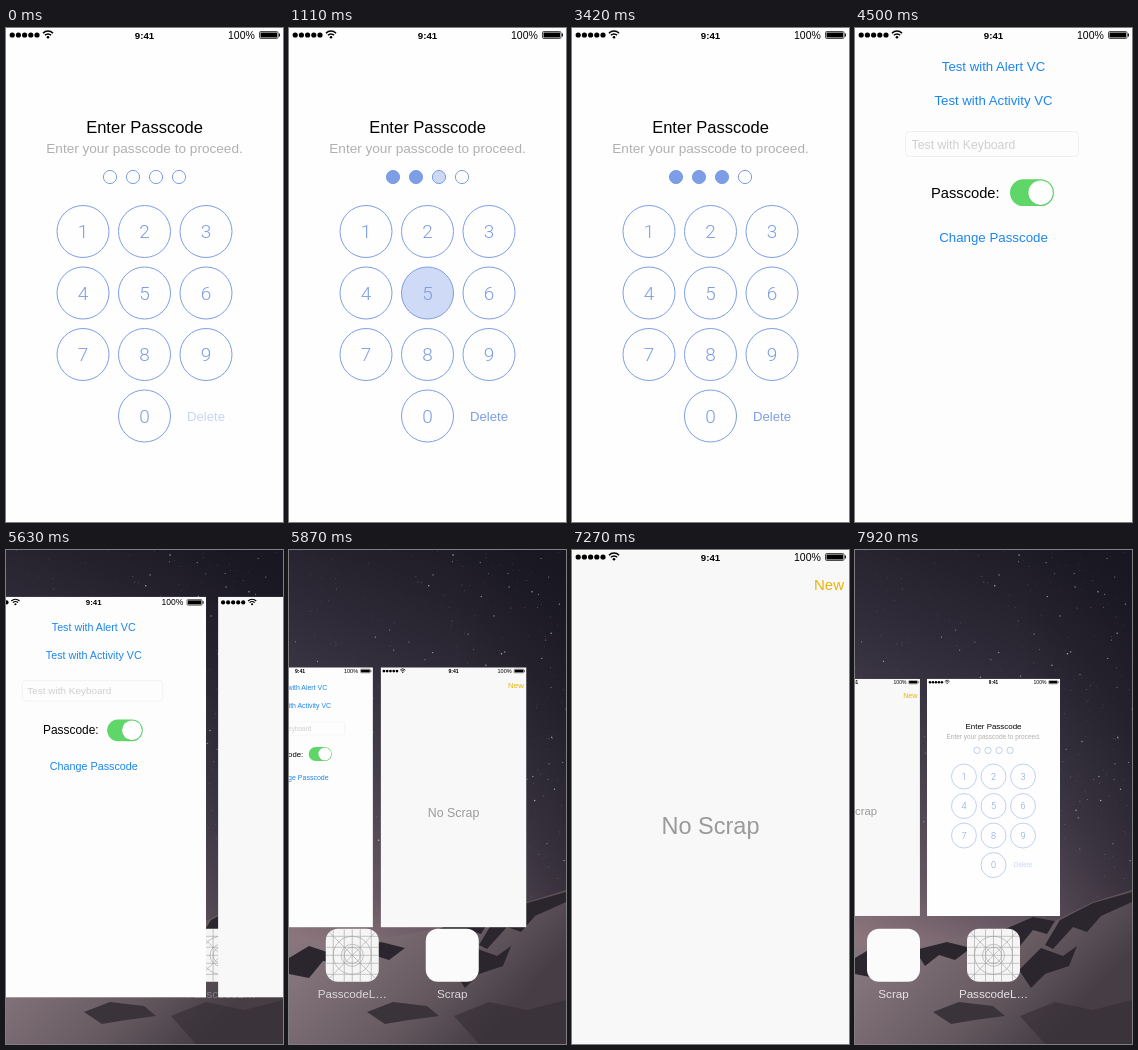
Recreate the animation shown at these times as an HTML page. Size 277 by 494 pixels, loop 8 s.

```html
<!DOCTYPE html>
<html lang="en">
<head>
<meta charset="utf-8">
<title>Passcode lock</title>
<style>
  html, body { margin: 0; width: 100%; height: 100%; overflow: hidden; background: #2c2b36; }
  svg { display: block; width: 100vw; height: 100vh; }
  text { font-family: "Liberation Sans", Arial, sans-serif; }
  .digit { font-family: Roboto, "Liberation Sans", sans-serif; font-weight: 300; }
</style>
</head>
<body>
<svg id="stage" viewBox="0 0 277 494" preserveAspectRatio="none"></svg>
<script>
const W = 277, H = 494, MID = W / 2, LOOP = 8000;
const BLUE = [125, 158, 230], RED = [240, 125, 125];
const ACCENT = `rgb(${BLUE})`, LINK = '#1c86ee';
const REST_SCALE = 0.48, CARD_PITCH = 291.7, ICON_PITCH = 100;

const text = (x, y, size, fill, label, extra = 'text-anchor="middle"') =>
  `<text x="${x}" y="${y}" font-size="${size}" fill="${fill}" ${extra}>${label}</text>`;
const rect = (x, y, w, h, fill, extra = '') =>
  `<rect x="${x}" y="${y}" width="${w}" height="${h}" fill="${fill}" ${extra}/>`;
const circle = (x, y, r, extra) => `<circle cx="${x}" cy="${y}" r="${r}" ${extra}/>`;
const path = (d, extra) => `<path d="${d}" ${extra}/>`;
const range = (n, fn) => Array.from({ length: n }, (_, i) => fn(i)).join('');

function randomFrom(seed) {
  return () => (seed = (seed * 16807) % 2147483647) / 2147483647;
}

function wallpaper() {
  const rnd = randomFrom(71);
  const stars = range(520, () => {
    const x = rnd() * W, y = rnd() * 350, glow = rnd();
    return circle(x.toFixed(1), y.toFixed(1), (0.3 + glow ** 5 * 0.5).toFixed(2),
      `fill="#e2dcf0" opacity="${(0.2 + glow * 0.5).toFixed(2)}"`);
  });
  const rocks = 'fill="#2b262d"';
  return `<defs>
    <linearGradient id="sky" gradientUnits="userSpaceOnUse" x1="40" y1="400" x2="215" y2="0">
      <stop offset="0" stop-color="#8b757c"/><stop offset=".16" stop-color="#665762"/>
      <stop offset=".42" stop-color="#453e4c"/><stop offset=".7" stop-color="#2e2a37"/>
      <stop offset="1" stop-color="#1b1924"/>
    </linearGradient>
    <linearGradient id="night" x1="0" y1="0" x2="1" y2="0">
      <stop offset=".6" stop-color="#15131c" stop-opacity="0"/>
      <stop offset="1" stop-color="#15131c" stop-opacity=".4"/>
    </linearGradient>
    <linearGradient id="snow" gradientUnits="userSpaceOnUse" x1="60" y1="370" x2="190" y2="494">
      <stop offset="0" stop-color="#84747b"/><stop offset=".6" stop-color="#65595f"/>
      <stop offset="1" stop-color="#463d45"/>
    </linearGradient></defs>` +
    rect(0, 0, W, H, 'url(#sky)') + rect(0, 0, W, H, 'url(#night)') + stars +
    path('M0 399 L22 391 48 400 85 392 118 384 150 378 178 367 200 371 238 352 277 340 V494 H0Z', 'fill="url(#snow)"') +
    path('M150 379 L178 367 200 371 192 384 178 380 164 397 154 392Z', rocks) +
    path('M205 370 L238 353 277 342 V352 L246 366 232 382 218 377 198 399 190 395Z', rocks) +
    path('M164 420 L186 398 208 406 222 396 214 416 190 424 176 438Z', rocks) +
    path('M0 408 L20 396 44 404 66 401 54 413 34 411 20 428 0 424Z', rocks) +
    path('M60 400 L92 392 116 398 100 410 84 405 70 416Z', rocks) +
    path('M78 462 L104 452 138 456 150 466 120 470 96 474Z', 'fill="#3a333a"') +
    path('M165 466 L200 452 238 460 277 450 V494 H190Z', 'fill="#342d34" opacity=".6"');
}

function statusBar() {
  const arc = r => path(`M${42 - r * .72} ${10.3 - r * .72} A${r} ${r} 0 0 1 ${42 + r * .72} ${10.3 - r * .72}`,
    'fill="none" stroke="#000" stroke-width="1.5"');
  return range(5, i => circle(6.2 + i * 6.2, 7, 2.6, '')) +
    arc(7) + arc(4.3) + circle(42, 9.3, 1.3, '') +
    text(MID, 10.6, 9.7, '#000', '9:41', 'text-anchor="middle" font-weight="700"') +
    text(222, 10.7, 10.5, '#000', '100%', '') +
    rect(253.5, 3.5, 18.5, 7, 'none', 'rx="1.3" stroke="#000" stroke-width=".7"') +
    rect(254.5, 4.5, 16.5, 5, '#000') + rect(272.7, 5.5, 1.2, 3, '#000');
}

function settingsScreen() {
  return rect(0, 0, W, H, '#fdfdfd') +
    text(MID, 42.5, 13.2, LINK, 'Test with Alert VC') +
    text(MID, 77, 13.2, LINK, 'Test with Activity VC') +
    rect(50.5, 103.5, 173, 25, '#fdfdfd', 'rx="4" stroke="#ececec" stroke-width=".8"') +
    text(56.5, 120.5, 12.3, '#cfcfd1', 'Test with Keyboard', '') +
    text(76, 169.5, 14.7, '#000', 'Passcode:', '') +
    rect(155, 151.3, 44, 26.8, '#5fd668', 'rx="13.4"') +
    circle(185.6, 165.2, 12.2, 'fill="#3f9a48" opacity=".5"') +
    circle(185.6, 164.7, 12.2, 'fill="#fff"') +
    text(MID, 213.5, 13.3, LINK, 'Change Passcode');
}

function keyPad() {
  return range(10, i => {
    const digit = (i + 1) % 10;
    const x = digit ? 77 + (i % 3) * 61.5 : 138.5;
    const y = 203.5 + Math.floor(i / 3) * 61.5;
    return circle(x, y, 26, `id="key${digit}" fill="${ACCENT}" fill-opacity="0" stroke="${ACCENT}"`) +
      text(x, y + 6.7, 19, ACCENT, digit, 'text-anchor="middle" class="digit"');
  });
}

function lockScreen() {
  return rect(0, 0, W, H, '#fefefe') +
    text(MID, 104.5, 16.55, '#000', 'Enter Passcode') +
    text(MID, 125.3, 13.6, '#b0b0b0', 'Enter your passcode to proceed.') +
    `<g id="dots">${range(4, i => circle(104 + i * 23, 149, 6.6, 'class="dot"'))}</g>` +
    keyPad() + text(200, 393, 13.2, ACCENT, 'Delete', 'text-anchor="middle" id="delete"');
}

function scrapScreen() {
  return rect(0, 0, W, H, '#f8f8f8') +
    text(257, 40, 15, '#e8b40c', 'New') +
    text(MID, 284, 23.5, '#9a9a9a', 'No Scrap');
}

function gridIcon() {
  const line = 'fill="none" stroke="#a0a0a0" stroke-width=".6"';
  const grid = [-19, -8, 0, 8, 19].map(v => path(`M${v} -26 V26 M-26 ${v} H26`, line)).join('');
  return rect(-26.5, -26.5, 53, 53, '#f5f5f5', 'rx="12"') + grid +
    [8, 11, 19].map(r => circle(0, 0, r, line)).join('') +
    path('M-23 -23 L23 23 M23 -23 L-23 23', line);
}

const card = (id, content) => `<g id="${id}" clip-path="url(#screen)">${content}${statusBar()}</g>`;
const icon = (id, shape, label) =>
  `<g id="${id}">${shape}${text(0, 43.2, 11.65, '#e6e3e8', label, 'text-anchor="middle" class="label"')}</g>`;

document.getElementById('stage').innerHTML =
  `<clipPath id="screen">${rect(0, 0, W, H, '#000')}</clipPath>` + wallpaper() +
  icon('appIcon', gridIcon(), 'PasscodeL…') +
  icon('scrapIcon', rect(-26.5, -26.5, 53, 53, '#fbfbfb', 'rx="12"'), 'Scrap') +
  card('appCard', settingsScreen() + `<g id="lock">${lockScreen()}</g>`) +
  card('scrapCard', scrapScreen());

const el = id => document.getElementById(id);
const dots = [...document.querySelectorAll('.dot')];
const labels = [...document.querySelectorAll('.label')];
const set = (node, name, value) => node.setAttribute(name, value);

const WRONG = [[580, 5], [790, 5], [1010, 5], [1230, 5]];
const RIGHT = [[2570, 1], [2860, 2], [3150, 3], [3780, 4]];
const SHAKE = 1290, RESET = 1780, DISMISS = 3830;

const ramp = (t, from, to) => Math.min(1, Math.max(0, (t - from) / (to - from)));
const spring = x => (1 + x) * Math.exp(-x);
const stepped = t => Math.floor(t / 60) * 60;

function drawLock(t) {
  const entry = t < 2300 ? WRONG : RIGHT;
  const kept = entry === WRONG ? 1 - ramp(t, RESET, 2030) : 1;
  const error = entry === WRONG ? ramp(t, SHAKE - 20, SHAKE + 100) * kept : 0;
  const color = `rgb(${BLUE.map((c, i) => Math.round(c + (RED[i] - c) * error))})`;

  dots.forEach((dot, i) => {
    set(dot, 'fill', color);
    set(dot, 'stroke', color);
    set(dot, 'fill-opacity', ramp(t, entry[i][0], entry[i][0] + 260) * kept);
  });
  const s = Math.max(0, t - SHAKE) / 1000;
  const shift = t > SHAKE && t < RESET + 100 ? -17 * Math.exp(-6 * s) * Math.cos(45 * s) : 0;
  set(el('dots'), 'transform', `translate(${shift} 0)`);

  for (let digit = 0; digit < 10; digit++) {
    const glow = entry.filter(press => press[1] === digit).map(([at]) =>
      ramp(t, at - 30, at + 50) * (1 - ramp(t, at + 70, at + 260)));
    set(el('key' + digit), 'fill-opacity', 0.45 * Math.max(0, ...glow));
  }
  const enabled = entry === WRONG
    ? ramp(t, 580, 680) * (1 - ramp(t, SHAKE - 20, SHAKE + 40))
    : ramp(t, 2570, 2670);
  set(el('delete'), 'opacity', 0.42 + 0.58 * enabled);

  const slide = 1 - (1 - ramp(t, DISMISS, DISMISS + 260)) ** 3;
  set(el('lock'), 'transform', `translate(0 ${slide * H})`);
}

// Switcher progress: 0 is full screen, 1 is the resting row of cards.
function switcherProgress(t) {
  if (t < 5630) return 0;
  if (t < 6220) return 1 - spring(1.27 + stepped(t - 5630) * 0.0115);
  if (t < 6390) return 1;
  if (t < 6860) return spring(0.77 + stepped(t - 6390) * 0.013);
  if (t < 7390) return 0;
  return t < 7920 ? 1 - spring(1.27 + stepped(t - 7390) * 0.012) : 1;
}

function drawSwitcher(t) {
  const p = switcherProgress(t);
  const scale = 1 - (1 - REST_SCALE) * p;
  const pitch = CARD_PITCH * scale;
  const zoomingIn = t >= 6390 && t < 7270;
  const first = zoomingIn ? MID - pitch : MID - CARD_PITCH * REST_SCALE * p;
  const order = t < 7270 ? ['app', 'scrap'] : ['scrap', 'app'];
  order.forEach((name, i) => {
    const left = first + i * pitch - MID * scale;
    const top = H / 2 * (1 - scale) + 0.4 * p;
    const iconX = 38.5 + i * ICON_PITCH + W * (1 - p);
    set(el(name + 'Card'), 'transform', `translate(${left} ${top}) scale(${scale})`);
    set(el(name + 'Icon'), 'transform', `translate(${iconX} 405.3)`);
  });
  labels.forEach(label => set(label, 'opacity', p));
}

function draw(now) {
  const t = now % LOOP;
  drawLock(t < 7270 ? t : 0);
  drawSwitcher(t);
}

const start = performance.now();
function tick() {
  draw(performance.now() - start);
  requestAnimationFrame(tick);
}
tick();
</script>
</body>
</html>
```
